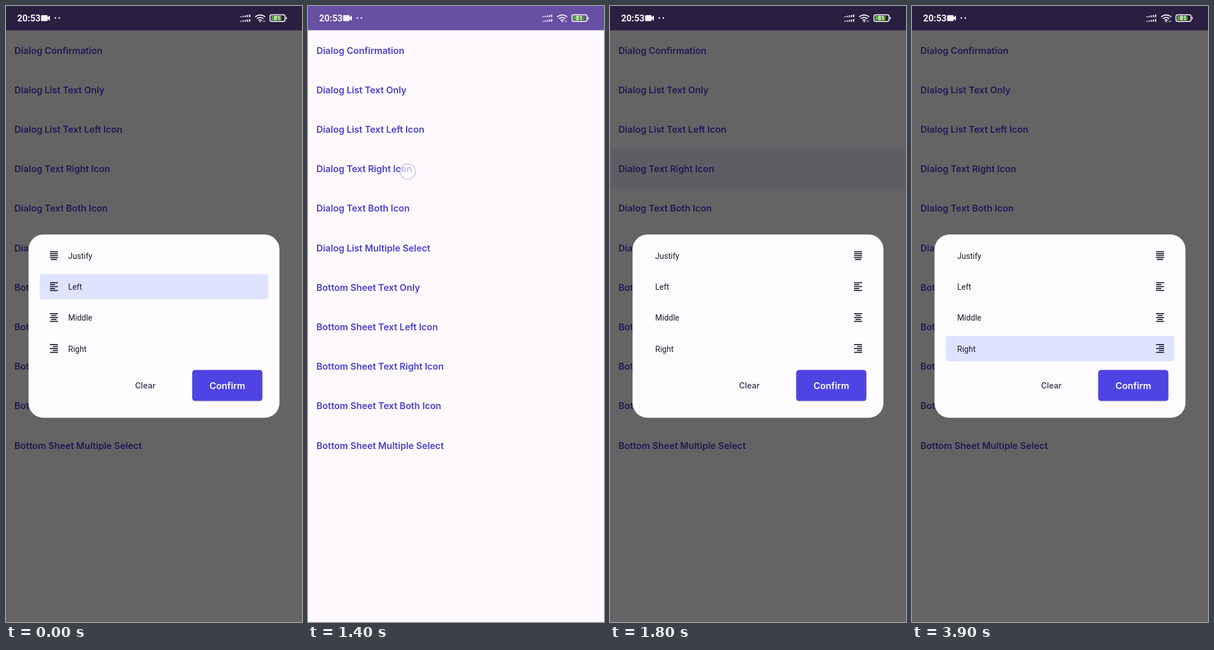
Animation, 519 px wide and 1079 px high, one loop 4000 ms. Source, as an HTML page:

```html
<!DOCTYPE html>
<html lang="en">
<head>
<meta charset="utf-8">
<title>Dialog demo</title>
<style>
  html, body { margin: 0; width: 100%; height: 100%; overflow: hidden; background: #fff9fe; }
  svg { display: block; }
  .list, .button { font: 600 16px Inter, sans-serif; }
  .list { fill: #4a40d0; }
  .button { text-anchor: middle; }
  .option { font: 400 14px Roboto, sans-serif; fill: #1b1a2c; }
  .clock { font: 600 16px Roboto, sans-serif; }
  .charge { font: 700 10px Roboto, sans-serif; text-anchor: middle; }
</style>
</head>
<body>
<svg id="stage" width="519" height="1079" viewBox="0 0 519 1079"></svg>
<script>
const LOOP = 4000, STEP = 100;
const ROW = 69.2, OPTION = 54.2;
const entries = [
  'Dialog Confirmation', 'Dialog List Text Only', 'Dialog List Text Left Icon',
  'Dialog Text Right Icon', 'Dialog Text Both Icon', 'Dialog List Multiple Select',
  'Bottom Sheet Text Only', 'Bottom Sheet Text Left Icon', 'Bottom Sheet Text Right Icon',
  'Bottom Sheet Text Both Icon', 'Bottom Sheet Multiple Select'
];
const options = ['Justify', 'Left', 'Middle', 'Right'];

// Five bars; the shorter ones follow the alignment.
function alignIcon(kind, y) {
  let bars = '';
  for (let i = 0; i < 5; i++) {
    const short = kind ? i % 2 : i === 4;
    const width = short ? (kind ? 9 : 10.5) : 14;
    const x = (14 - width) * [0.5, 0, 0.5, 1][kind];
    bars += `<rect x="${x}" y="${y - 8 + i * 3.4}" width="${width}" height="1.8"/>`;
  }
  return bars;
}

function statusIcons() {
  let signal = '';
  for (let i = 0; i < 5; i++) {
    const x = 412 + i * 3.8, h = 1.6 + i * 0.75;
    signal += `M${x} 19.6v${-h}M${x} 27.6v${-h}`;
  }
  return `<g fill="#f4f2f8">
    <text class="clock" x="19.5" y="27">20:53</text>
    <rect x="61.5" y="16" width="11.5" height="10.5" rx="1.5"/>
    <path d="M72 20.5l5-4v9.5l-5-4z"/>
    <circle cx="86.5" cy="21" r="1.4"/><circle cx="93.5" cy="21" r="1.4"/>
    <path d="${signal}" stroke="#f4f2f8" stroke-width="2.2"/>
    <g fill="none" stroke="#f4f2f8" stroke-width="2">
      <path d="M437 19.2a12.5 12.5 0 0 1 17.4 0M440 22.4a8.2 8.2 0 0 1 11.4 0M442.9 25.4a4 4 0 0 1 5.6 0"/>
      <rect x="462.8" y="15.3" width="26.4" height="11.8" rx="3" stroke-width="1.7"/>
    </g>
    <circle cx="445.7" cy="27.3" r="1.3"/>
    <path d="M451 28v-2.5M453.3 25.5v2.5" stroke="#f4f2f8" stroke-width="1"/>
    <rect x="465" y="17.2" width="18" height="8" rx="1" fill="#55a82b"/>
    <rect x="490.6" y="19" width="1.7" height="4.5" rx=".8"/>
    <text class="charge" x="475.5" y="25">81</text>
  </g>`;
}

document.getElementById('stage').innerHTML = `
  <defs>
    <clipPath id="rowClip"><rect y="250.2" width="519" height="69.2" rx="6"/></clipPath>
    <clipPath id="confirmClip"><rect x="326.5" y="637.6" width="123" height="54" rx="5"/></clipPath>
    <clipPath id="optionClip"><rect id="optionBounds" x="59" width="401" height="44.3" rx="5"/></clipPath>
  </defs>
  <rect width="519" height="1079" fill="#fff9fe"/>
  <rect width="519" height="42.5" fill="#674fa3"/>
  <g clip-path="url(#rowClip)"><circle id="rowRipple" cx="175" cy="290" fill="#4f43e4"/></g>
  ${entries.map((s, i) => `<text class="list" x="14.8" y="${83.5 + i * ROW}">${s}</text>`).join('')}
  <rect id="scrim" width="519" height="1079"/>
  ${statusIcons()}
  <g id="dialog">
    <rect x="39.5" y="400.3" width="440" height="321" rx="26" fill="#fefcff"/>
    <rect id="selection" x="59" width="401" height="44.3" rx="5" fill="#dee4ff"/>
    <g clip-path="url(#optionClip)"><circle id="optionRipple" cx="250" fill="#4f43e4"/></g>
    <g id="labels">${options.map((s, i) =>
      `<text class="option" y="${443 + i * OPTION}">${s}</text>`).join('')}</g>
    <g id="icons" fill="#1b1a2c">${options.map((s, i) => alignIcon(i, 437.6 + i * OPTION)).join('')}</g>
    <text class="button" x="244.3" y="670" fill="#47455f" style="font-size:14px">Clear</text>
    <rect x="326.5" y="638.8" width="123" height="54" rx="5" fill="#000" opacity=".22"/>
    <rect x="326.5" y="637.6" width="123" height="54" rx="5" fill="#4f43e4"/>
    <text class="button" x="388" y="670.8" fill="#fff">Confirm</text>
    <g clip-path="url(#confirmClip)"><circle id="confirmRipple" cx="387" cy="666" fill="#fff"/></g>
  </g>
  <circle id="touch" r="13.6" fill="#fff" fill-opacity=".62" stroke="#b4aee6" stroke-opacity=".6" stroke-width="2"/>`;

const el = Object.fromEntries(
  [...document.querySelectorAll('[id]')].map(node => [node.id, node]));

function set(node, attributes) {
  for (const name in attributes) node.setAttribute(name, attributes[name]);
}

// Linear interpolation through [time, value] points.
function track(t, points) {
  let [t0, v0] = points[0];
  for (const [t1, v1] of points) {
    if (t < t1) return t <= t0 ? v0 : v0 + (v1 - v0) * (t - t0) / (t1 - t0);
    [t0, v0] = [t1, v1];
  }
  return v0;
}

const taps = [
  { x: 387, y: 666, start: 200, end: 400 },
  { x: 175, y: 290, start: 1400, end: 1500 },
  { x: 250, y: 547, start: 2500, end: 2600 },
  { x: 250, y: 601, start: 3200, end: 3300 }
];
const SCRIM = [[200, .6], [300, .48], [400, .27], [500, .08], [600, 0], [1600, 0], [1700, .2], [1800, .6]];
const DIALOG = [[200, 1], [300, .6], [400, .11], [500, 0], [1600, 0], [1700, .72], [1800, 1]];
const ROW_TINT = [[1400, 0], [1500, .2], [1600, .4], [1700, .42], [1800, .09], [1900, 0]];

function draw(t) {
  set(el.scrim, { opacity: track(t, SCRIM) });
  set(el.dialog, { opacity: track(t, DIALOG) });
  set(el.rowRipple, {
    r: track(t, [[1400, 0], [1500, 70], [1600, 230], [1700, 400]]),
    opacity: track(t, ROW_TINT)
  });
  set(el.confirmRipple, {
    r: track(t, [[200, 16], [400, 40], [500, 60]]),
    opacity: track(t, [[100, 0], [200, .2], [400, .25], [500, 0]])
  });

  const iconsLeft = t < 1000;
  set(el.labels, { transform: `translate(${iconsLeft ? 109 : 79.3} 0)` });
  set(el.icons, { transform: `translate(${iconsLeft ? 77 : 428} 0)` });

  const selected = iconsLeft ? 1 : t < 2600 ? -1 : t < 3300 ? 2 : 3;
  set(el.selection, { y: 415.3 + selected * OPTION, opacity: selected < 0 ? 0 : 1 });

  const press = t < 3000 ? taps[2] : taps[3];
  const age = t - press.start;
  set(el.optionBounds, { y: press.y - 23.4 });
  set(el.optionRipple, {
    cy: press.y,
    r: track(age, [[0, 20], [200, 230]]),
    opacity: track(age, [[-100, 0], [0, .08], [100, .16], [300, 0]])
  });

  const tap = taps.find(({ start, end }) => t >= start && t < end + STEP);
  set(el.touch, tap ? { cx: tap.x, cy: tap.y, opacity: 1 } : { opacity: 0 });
}

function frame() {
  draw(Math.floor(performance.now() % LOOP / STEP) * STEP);
  requestAnimationFrame(frame);
}
frame();
</script>
</body>
</html>
```
